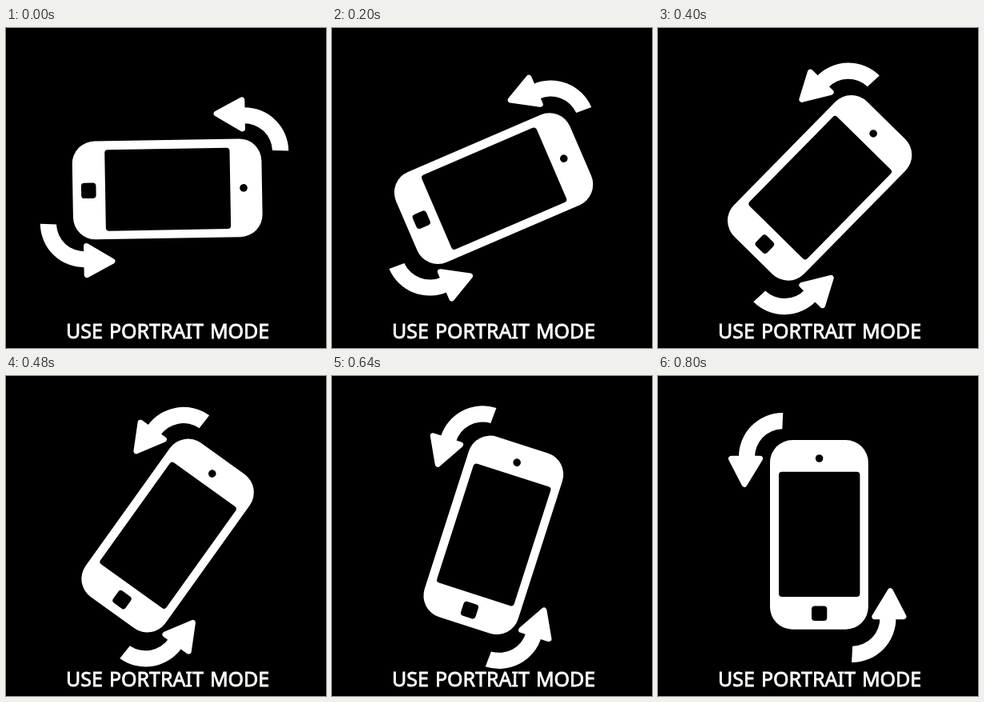
Write an HTML page that moves like this. It is 400x400 px and loops after 1120 ms.

```html
<!DOCTYPE html>
<html lang="en">
<head>
<meta charset="utf-8">
<title>Use portrait mode</title>
<style>
  html, body { margin: 0; height: 100%; overflow: hidden; background: #000; }
  svg { display: block; width: 100%; height: 100%; }
  text { font: 25px "Noto Sans", "Open Sans", sans-serif; word-spacing: 1.5px; stroke: #fff; stroke-width: .8px; }
</style>
</head>
<body>
<svg viewBox="0 0 400 400" fill="#fff">
  <defs>
    <g id="arrow">
      <path d="M156.3 46A55 55 0 0 0 101 102H121A35 35 0 0 1 155.3 66.2Z"/>
      <path d="M91.5 103.3H127.6L108.1 135.3Z" stroke="#fff" stroke-width="7" stroke-linejoin="round"/>
    </g>
  </defs>
  <g id="device">
    <rect x="140" y="80" width="122.8" height="236.7" rx="28"/>
    <g fill="#000">
      <rect x="151" y="119.7" width="101.4" height="156.3" rx="4"/>
      <circle cx="201.6" cy="103" r="4.8"/>
      <rect x="192" y="287.5" width="19.3" height="18.5" rx="4"/>
    </g>
    <use href="#arrow"/>
    <use href="#arrow" transform="rotate(180 199.2 202)"/>
  </g>
  <text x="75" y="387.6">USE PORTRAIT MODE</text>
</svg>
<script>
  const device = document.getElementById("device");
  const LOOP = 1120, STEP = 40, TURNS = 20, DEGREES = 4.45;
  const start = performance.now();

  // Turn upright in equal steps, then hold until the loop restarts.
  function draw() {
    const time = (performance.now() - start) % LOOP;
    const left = Math.max(0, TURNS - Math.floor(time / STEP));
    device.setAttribute("transform", `rotate(${left * DEGREES} 200 200)`);
    requestAnimationFrame(draw);
  }
  draw();
</script>
</body>
</html>
```
